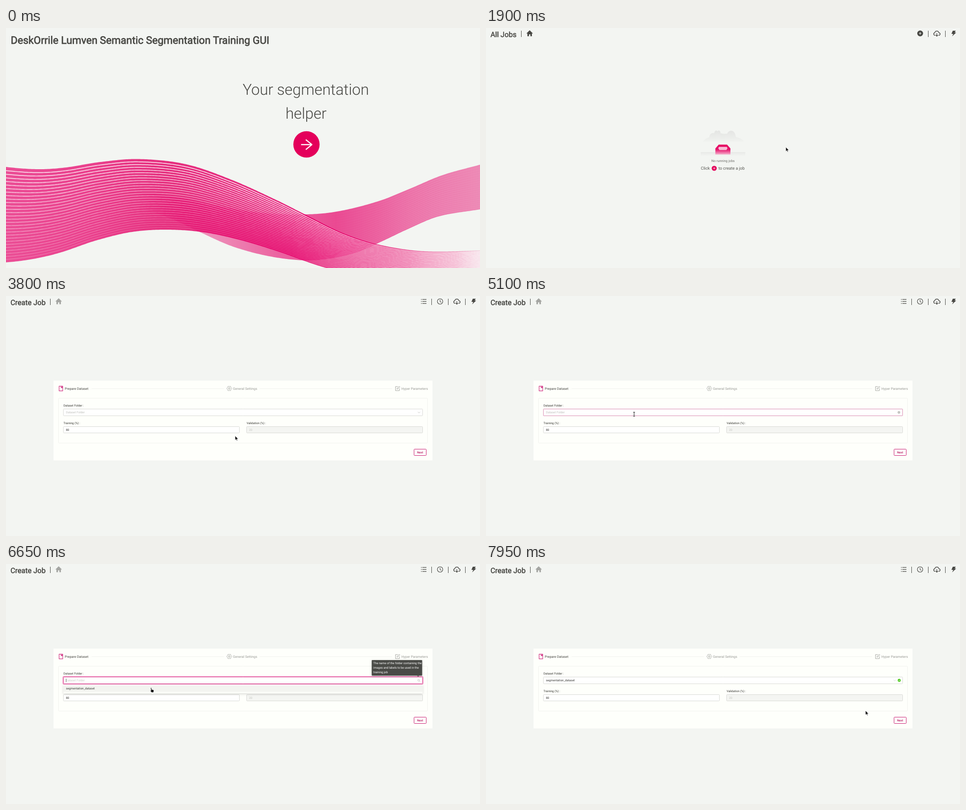
Write an HTML page with a canvas that moves like this. It is 1053 px wide and 532 px high and loops after 8 s.

```html
<!DOCTYPE html>
<html lang="en">
<head>
<meta charset="utf-8">
<title>Segmentation training</title>
<style>
html, body { margin: 0; width: 100%; height: 100%; overflow: hidden; background: #f3f5f2; }
canvas { display: block; }
</style>
</head>
<body>
<canvas id="stage" width="1053" height="532"></canvas>
<script>
const W = 1053, H = 532, LOOP = 8000;
const BG = '#f3f5f2', INK = '#484844', PINK = '#e4005b', MAGENTA = '#c9176f', GREY = '#999a96';
const c = document.getElementById('stage').getContext('2d');
const ramp = (t, a, b) => Math.min(1, Math.max(0, (t - a) / (b - a)));
const within = (t, a, b) => t >= a && t < b;

// ---------- helpers ----------
function text(s, x, y, size, color = INK, o = {}) {
  c.font = `${o.weight || 400} ${size}px Roboto, sans-serif`;
  c.textAlign = o.align || 'left';
  c.textRendering = 'geometricPrecision';
  c.fillStyle = c.strokeStyle = color;
  c.fillText(s, x, y);
  if (o.bold) { c.lineWidth = o.bold; c.lineJoin = 'round'; c.strokeText(s, x, y); }
}

function shape(d, fill, stroke, width = 1) {
  const p = new Path2D(d);
  if (fill) { c.fillStyle = fill; c.fill(p); }
  if (stroke) { c.strokeStyle = stroke; c.lineWidth = width; c.stroke(p); }
}

function disc(x, y, r, fill, stroke, width = 1) {
  c.beginPath();
  c.arc(x, y, r, 0, Math.PI * 2);
  if (fill) { c.fillStyle = fill; c.fill(); }
  if (stroke) { c.strokeStyle = stroke; c.lineWidth = width; c.stroke(); }
}

function box(x, y, w, h, fill, stroke, r = 1, width = 1) {
  c.beginPath();
  c.roundRect(x, y, w, h, r);
  if (fill) { c.fillStyle = fill; c.fill(); }
  if (stroke) { c.strokeStyle = stroke; c.lineWidth = width; c.stroke(); }
}

function gradient(g, x0, y0, x1, y1, stops) {
  const lg = g.createLinearGradient(x0, y0, x1, y1);
  stops.forEach(([p, color]) => lg.addColorStop(p, color));
  return lg;
}

// Smooth function y(x) through a few points
function curve(...p) {
  const n = p.length;
  const slope = i => {
    const a = Math.max(0, i - 1), b = Math.min(n - 1, i + 1);
    return (p[b][1] - p[a][1]) / (p[b][0] - p[a][0]);
  };
  return x => {
    let i = 0;
    while (i < n - 2 && x > p[i + 1][0]) i++;
    const [x0, y0] = p[i], [x1, y1] = p[i + 1], h = x1 - x0, u = (x - x0) / h;
    const v = u * u * (3 - 2 * u);
    return y0 + (y1 - y0) * v + h * u * (1 - u) * (slope(i) * (1 - u) - slope(i + 1) * u);
  };
}

// ---------- ribbons ----------
function makeWave() {
  const cv = document.createElement('canvas');
  cv.width = W; cv.height = H;
  const g = cv.getContext('2d');
  const topA = curve([-60, 299], [0, 308], [70, 313], [130, 309.5], [210, 297], [295, 290.5], [400, 302],
    [500, 336], [600, 381], [668, 415], [750, 455], [832, 481], [930, 495], [1053, 493], [1120, 488]);
  const botA = curve([-60, 521], [0, 519.5], [60, 512], [120, 498], [200, 471], [280, 452], [360, 447],
    [440, 453], [520, 470], [600, 494], [712, 532], [850, 562], [1053, 552]);
  const topB = curve([290, 362], [380, 375], [470, 394], [560, 409], [668, 413], [740, 406],
    [830, 383], [900, 355], [970, 326], [1053, 303]);
  const botB = curve([290, 400], [360, 420], [430, 452], [500, 483], [580, 505], [660, 515],
    [720, 511], [780, 497], [835, 473], [890, 447], [960, 418], [1053, 402]);

  const trace = (f, a, b, dir = 1) => {
    for (let i = 0; i <= b - a; i += 3) {
      const x = dir > 0 ? a + i : b - i;
      g.lineTo(x, f(x));
    }
    const end = dir > 0 ? b : a;
    g.lineTo(end, f(end));
  };
  const band = (top, bot, a, fill) => {
    g.beginPath();
    trace(top, a, W);
    trace(bot, a, W, -1);
    g.closePath();
    g.fillStyle = fill;
    g.fill();
  };
  const strands = (top, bot, a, count, style) => {
    for (let k = 1; k < count; k++) {
      const u = k / count, v = u * (1.12 - .12 * u);
      g.beginPath();
      trace(x => top(x) + (bot(x) - top(x)) * v, a, W);
      style(u);
      g.stroke();
    }
  };

  band(topA, botA, 0, gradient(g, 0, 0, W, 0, [
    [0, '#eb4f96'], [.17, '#ea428e'], [.33, '#e6307f'], [.6, '#e62c80'],
    [.72, 'rgba(230,30,120,.85)'], [.85, 'rgba(232,40,125,.75)'],
    [.95, 'rgba(235,70,140,.55)'], [1, 'rgba(240,120,170,.3)']]));
  band(topB, botB, 290, gradient(g, 290, 0, W, 0, [
    [0, 'rgba(230,0,105,0)'], [.12, 'rgba(230,0,105,.36)'], [.25, 'rgba(230,0,105,.45)'],
    [.42, 'rgba(230,0,105,.6)'], [.58, 'rgba(230,0,105,.7)'],
    [.8, 'rgba(230,10,110,.56)'], [1, 'rgba(230,10,110,.46)']]));
  g.lineWidth = .8;
  strands(topB, botB, 690, 20, () => {
    g.strokeStyle = gradient(g, 690, 0, W, 0, [[0, 'rgba(255,255,255,0)'], [.7, 'rgba(255,255,255,.16)'], [1, 'rgba(255,255,255,.05)']]);
  });
  strands(topA, botA, 0, 29, u => {
    const a = .98 - .68 * u;
    g.lineWidth = 1.5 - .5 * u;
    g.strokeStyle = gradient(g, 0, 0, W, 0, [
      [0, `rgba(255,255,255,${a})`], [.3, `rgba(255,255,255,${a * (1 - .4 * u)})`],
      [.6, `rgba(255,255,255,${a * (1 - .4 * u)})`], [.8, 'rgba(255,255,255,.6)'], [1, 'rgba(255,255,255,.8)']]);
  });
  return cv;
}
const wave = makeWave();

// ---------- icons ----------
function divider(x) { c.fillStyle = INK; c.fillRect(x, 6, 1, 14); }

function home(x, color) {
  c.save();
  c.translate(x, 12);
  shape('M0-7L7.3.3H5V6.3H1.5V2H-1.5V6.3H-5V.3H-7.3Z', color);
  c.restore();
}

function plus(x, y, r, fill) {
  disc(x, y, r, fill);
  const s = r * .43;
  shape(`M${x - s} ${y}h${2 * s}M${x} ${y - s}v${2 * s}`, null, BG, r > 6 ? 1.2 : .9);
}

function headerRight() {
  divider(982);
  shape('M998 16.3C993.5 16 993.5 11 997 10.5C998 5.5 1005 5.5 1006 10.5C1010 11 1010 16 1005.3 16.3', null, INK, 1.4);
  shape('M1001.5 11.5V18M999 15.5L1001.5 18.3L1004 15.5', null, INK, 1.3);
  divider(1020);
  shape('M1037 6H1043.5L1041.3 10H1044.5L1035.5 18.5L1038 13H1034Z', INK);
}

function chevron(x, y, color) { shape(`M${x - 2.4} ${y - 1.2}l2.4 2.6l2.4-2.6`, null, color, .8); }

function gear(x, y) {
  c.beginPath();
  for (let i = 0; i <= 48; i++) {
    const a = i / 48 * Math.PI * 2, r = 4.9 + .55 * Math.cos(6 * a);
    c.lineTo(x + r * Math.cos(a), y + r * Math.sin(a));
  }
  c.strokeStyle = GREY; c.lineWidth = .9; c.stroke();
  disc(x, y, 1.9, null, GREY, .9);
}

// ---------- pages ----------
function welcome(t) {
  c.drawImage(wave, 0, 0);
  text('DeskOrrile Lumven', 10.5, 35, 23.1, INK, { bold: .8 });
  text('Semantic Segmentation Training GUI', 208.6, 35, 23.1, INK, { bold: .8 });
  text('Your segmentation', 666, 147.5, 33.8, INK, { weight: 300, align: 'center' });
  text('helper', 666.5, 200.5, 33.8, INK, { weight: 300, align: 'center' });
  disc(667.5, 258, 29.2, PINK);
  const hover = ramp(t, 750, 900);
  if (hover) disc(667.5, 258, 29.2, `rgba(242,40,125,${hover})`);
  shape('M655.5 258.5H679M666 247.5L679.5 258.5L666 269.5', null, '#fff', 2.4);
}

function jobs() {
  text('All Jobs', 10, 20, 16.1, INK, { bold: .55 });
  divider(78);
  home(97, INK);
  plus(964.5, 12, 6.5, INK);
  headerRight();

  shape('M482 252C486 246 491 244 496 242C497 235 501 232 507 233C508 227 512 226 514 229C518 225 521 229 521 233C527 235 530 235 536 234C538 227 548 225 552 232C555 237 554 240 556 242C563 243 569 246 573 252Z',
    gradient(c, 0, 227, 0, 252, [[0, '#e4e5e3'], [1, '#f0f2ef']]));
  c.fillStyle = gradient(c, 0, 275, 0, 284, [[0, '#e8e9e7'], [1, BG]]);
  c.fillRect(477, 275, 99, 9);
  shape('M509.5 267L517 258.5H535.5L543 267V280.5H509.5Z',
    gradient(c, 0, 258, 0, 281, [[0, '#e6005f'], [.5, '#e6156d'], [1, '#f6b9d2']]));
  shape('M517.5 263.5H535L536.5 266.5L534 270.5H518.5L516 266.5Z', '#f7bdd5');

  text('No running jobs', 526.5, 297, 7.36, '#6d6d69', { align: 'center' });
  text('Click', 477.3, 314.4, 9.2, '#565652');
  plus(507, 311, 5.6, PINK);
  text('to create a job', 516.4, 314.4, 9.2, '#565652');
}

function field(x, y, w, h, hover, focus, fill = '#fff') {
  if (focus) box(x - 1, y - 1, w + 2, h + 2, null, `rgba(226,0,116,${.45 * focus})`, 1.5, 1.3);
  box(x, y, w, h, fill, '#d8d9d5');
  const on = Math.max(hover, focus);
  if (on) box(x, y, w, h, null, `rgba(217,60,140,${on})`);
}

function tooltip(x, y, w, h, lines, step, alpha) {
  if (!alpha) return;
  c.save();
  c.globalAlpha = alpha;
  c.shadowColor = 'rgba(0,0,0,.2)';
  c.shadowBlur = 5;
  c.shadowOffsetY = 1;
  box(x, y, w, h, '#494a46');
  c.shadowColor = 'transparent';
  lines.forEach((s, i) => text(s, x + 3.6, y + 9.2 + i * step, 6.44, '#fff'));
  c.restore();
}

function create(t) {
  const hover = ramp(t, 5000, 5200) * (1 - ramp(t, 6750, 6850));
  const focus = ramp(t, 5200, 5300) * (1 - ramp(t, 6700, 6800));
  const open = ramp(t, 5200, 5350) * (1 - ramp(t, 6700, 6800));
  const trainHover = Math.max(ramp(t, 4400, 4450) * (1 - ramp(t, 4500, 4600)),
    ramp(t, 7250, 7350) * (1 - ramp(t, 7550, 7700)));
  const picked = t >= 6700;

  text('Create Job', 10, 20, 16.1, INK, { bold: .55 });
  divider(98);
  home(117, '#a5a6a3');
  for (let y = 7.5; y < 18; y += 4.5) {
    c.fillStyle = INK;
    c.fillRect(922, y - .6, 1.6, 1.3);
    c.fillRect(925, y - .6, 9, 1.3);
  }
  divider(945);
  disc(964.3, 12, 6, null, INK, 1.2);
  shape('M964.3 8V12.3L967 14', null, INK, 1.1);
  headerRight();

  c.fillStyle = '#fefffb';
  c.fillRect(105.5, 187.5, 842, 177);
  c.fillStyle = '#f0f1ed';
  c.fillRect(190, 205, 294, 1);
  c.fillRect(563, 205, 295, 1);
  shape('M118 199.8H126V210.3H118ZM122.5 199.8V203.5L123.8 202.6L125 203.5V199.8', null, '#cf2a7f', 1.2);
  text('Prepare Dataset', 130.5, 208, 7.36, INK);
  gear(496, 205);
  text('General Settings', 504.3, 208, 7.36, GREY);
  shape('M870.5 200.8H865.3V209.8H874V205M868.5 206.5L869 204.5L873.5 200L875 201.5L870.5 206Z', null, GREY, .9);
  text('Hyper Parameters', 878.3, 208, 7.36, GREY);

  box(116.5, 226.5, 820, 99.5, null, '#f1f2ee', 2);
  text('Dataset Folder :', 127.7, 245, 6.44, '#333330');
  field(127.5, 250.5, 798, 15, hover, focus);
  if (picked) text('segmentation_dataset', 133.2, 260.3, 6.44, '#333330');
  else text('Dataset Folder', 133.2, 260.3, 6.44, focus ? '#c9cac6' : '#bdbeba');

  if (picked) {
    chevron(908, 258, '#d0d1cd');
    disc(918, 257.8, 3.4, '#52c922');
    shape('M916.4 257.9L917.6 259.1L919.7 256.6', null, '#fff', .9);
  } else if (focus) {
    c.fillStyle = '#555';
    c.fillRect(133, 254, .8, 8);
    disc(916.7, 257.6, 2, null, '#b5b6b2', .8);
    shape('M918.2 259.2L919.8 260.8', null, '#b5b6b2', .9);
  } else if (hover) {
    disc(917.3, 258, 2.8, '#b8b9b5');
    shape('M916.4 257.1L918.2 258.9M918.2 257.1L916.4 258.9', null, '#fff', .6);
  } else chevron(917.5, 258, '#b9bab6');

  text('Training (%) :', 127.7, 283.5, 6.44, '#333330');
  field(127.5, 289.5, 391, 14, trainHover, 0);
  text('80', 133.2, 299, 6.44, '#333330');
  if (trainHover) {
    c.globalAlpha = trainHover;
    shape('M508.5 290V303M508.5 296.5H518', null, '#efefeb', .7);
    c.globalAlpha = 1;
  }
  text('Validation (%) :', 534.5, 283.5, 6.44, '#333330');
  field(534.5, 289.5, 391, 14, 0, 0, '#f4f5f2');
  text('20', 540, 299, 6.44, '#c2c3bf');
  box(906.5, 339.5, 27, 14, '#fffffd', MAGENTA, 1);
  text('Next', 920, 348.6, 6.44, '#b5155f', { align: 'center', weight: 500 });

  if (open) {
    c.save();
    c.globalAlpha = open;
    c.shadowColor = 'rgba(0,0,0,.16)';
    c.shadowBlur = 5;
    c.shadowOffsetY = 1.5;
    const h = 19 * (.8 + .2 * open);
    box(127.5, 267.5, 798, h, '#fefffb');
    c.shadowColor = 'transparent';
    c.fillStyle = '#f3f4f0';
    c.fillRect(127.5, 269, 798, h - 4.5);
    text('segmentation_dataset', 133.2, 278.4, 6.44, '#333330');
    c.restore();
  }

  const tipA = ramp(t, 5150, 5350) * (1 - ramp(t, 6650, 6800));
  tooltip(812.5, 213, 112, 34.5, ['The name of the folder containing the',
    'images and labels to be used in the', 'training job'], 9.7, tipA);
  if (tipA) {
    c.globalAlpha = tipA;
    shape('M913 247.5H918L915.5 249.8Z', '#494a46');
    c.globalAlpha = 1;
  }
  const tipB = ramp(t, 7350, 7520) * (1 - ramp(t, 7650, 7800));
  tooltip(410, 309, 103, 22.5, ['The percentage of the dataset', 'images needed for training'], 8.8, tipB);
  if (tipB) {
    c.globalAlpha = tipB;
    shape('M503 309H508L505.5 306.8Z', '#494a46');
    c.globalAlpha = 1;
  }
}

// ---------- pointer ----------
// time, x, y; straight moves between stops
const path = [
  [400, 577, 411], [550, 577, 411], [900, 656, 270], [1150, 656, 270], [1250, 666, 264],
  [2000, 666, 264], [2200, 639, 283], [2300, 639, 283], [2600, 496, 320], [2700, 496, 320],
  [2750, 499, 320], [2900, 499, 320], [2950, 507, 311], [3799, 507, 311], [3800, 509, 310],
  [3850, 509, 310], [3900, 505, 322], [4050, 505, 322], [4250, 463, 351], [4350, 463, 351],
  [4550, 432, 278], [4700, 432, 278], [5100, 329, 262], [6150, 329, 262], [6450, 321, 274],
  [7100, 321, 274], [7400, 346, 299], [7500, 346, 299], [7950, 843, 325]
];

function pointerAt(t) {
  let i = 0;
  while (i < path.length - 2 && t > path[i + 1][0]) i++;
  const [t0, x0, y0] = path[i], [t1, x1, y1] = path[i + 1], u = ramp(t, t0, t1);
  return [x0 + (x1 - x0) * u, y0 + (y1 - y0) * u];
}

function pointer(t) {
  if (t < 400) return;
  const [x, y] = pointerAt(t);
  const onButton = t < 1900 && Math.hypot(x - 667.5, y - 258) < 29;
  const onPlus = within(t, 2950, 3800);
  const onOption = within(t, 5350, 6750) && y > 267;
  const inInput = t >= 3800 && x < 518 &&
    ((y > 250 && y < 266) || (y > 289 && y < 304));
  c.save();
  c.translate(x, y);
  c.lineJoin = 'round';
  if (onButton || onPlus || onOption) {
    shape('M.2.8C.5-.3 2-.2 2.2.8L2.7 4L6 4.9C7.2 5.3 7.5 6 7.3 7.2L6.7 10.8H2.5L-.2 7.6C-.8 6.6.3 6 1.2 6.6Z', '#111', '#fff', .7);
  } else if (inInput) {
    const beam = 'M-2-4.5H2M0-4.5V4.5M-2 4.5H2';
    shape(beam, null, '#fff', 2);
    shape(beam, null, '#222', 1.1);
  } else {
    shape('M0 0V9.6L2.2 7.6L3.8 11L5.3 10.3L3.8 7.1H6.9Z', '#111', '#fff', .7);
  }
  c.restore();
}

function draw(t) {
  c.fillStyle = BG;
  c.fillRect(0, 0, W, H);
  if (t < 1900) welcome(t);
  else if (t < 3800) jobs();
  else create(t);
  pointer(t);
}

const start = performance.now();
function tick() {
  const t = (performance.now() - start) % LOOP;
  draw(Math.floor(t / 50) * 50);
  requestAnimationFrame(tick);
}
tick();
</script>
</body>
</html>
```
